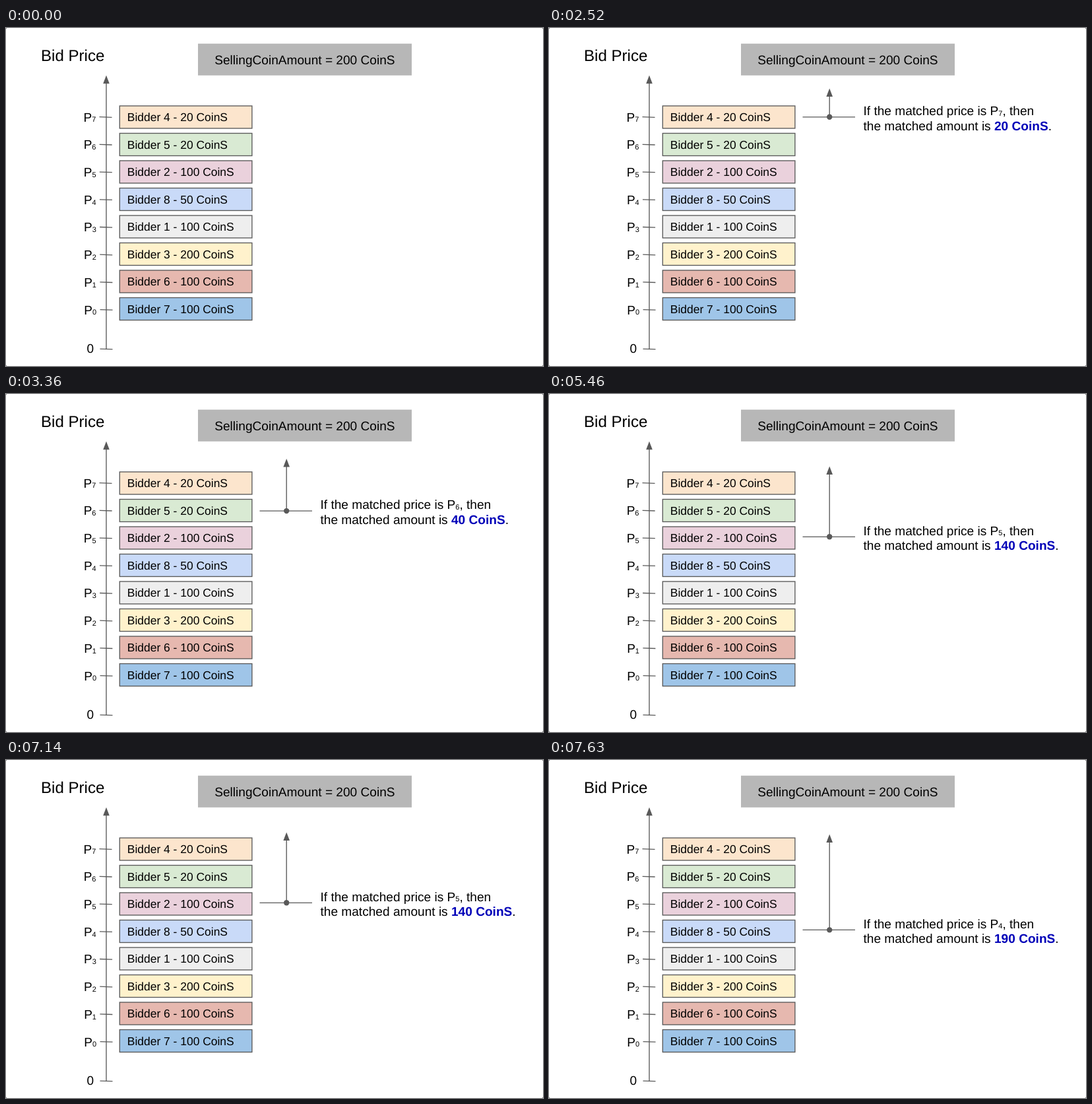
An HTML page with a canvas for the animation above (8 s loop, 814x512 px).

```html
<!DOCTYPE html>
<html lang="en">
<head>
<meta charset="utf-8">
<title>Bid matching</title>
<style>
  html, body { margin: 0; width: 100%; height: 100%; overflow: hidden; background: #fff; }
  canvas { display: block; }
</style>
</head>
<body>
<canvas id="stage" width="814" height="512"></canvas>
<script>
const ctx = document.getElementById('stage').getContext('2d');
const LOOP = 8000;
const INK = '#595959';
const FAMILY = '"Liberation Sans", Arial, sans-serif';
const SUB_SIZE = 11;

// Highest price first.
const bids = [
  { bidder: 4, coins: 20, color: '#fce5cd' },
  { bidder: 5, coins: 20, color: '#d9ead3' },
  { bidder: 2, coins: 100, color: '#ead1dc' },
  { bidder: 8, coins: 50, color: '#c9daf8' },
  { bidder: 1, coins: 100, color: '#eeeeee' },
  { bidder: 3, coins: 200, color: '#fff2cc' },
  { bidder: 6, coins: 100, color: '#e6b8af' },
  { bidder: 7, coins: 100, color: '#9fc5e8' }
];

// One candidate price per step, from the top bid downwards.
const matches = [
  { start: 1260, lineY: 134.8, tip: 91.5, textY: 132 },
  { start: 3360, lineY: 177.1, tip: 98, textY: 174 },
  { start: 5460, lineY: 216.3, tip: 109.5, textY: 213.5 },
  { start: 7560, lineY: 257.4, tip: 112.5, textY: 254.5 }
];

// Draws text and returns the x where it ends.
function text(str, x, y, size, color = '#000', weight = 'normal') {
  ctx.font = `${weight} ${size}px ${FAMILY}`;
  ctx.fillStyle = color;
  ctx.fillText(str, x, y);
  return x + ctx.measureText(str).width;
}

function priceName(index, x, y, size) {
  const end = text('P', x, y, size);
  return text(String(index), end, y + 0.8, SUB_SIZE);
}

function line(x1, y1, x2, y2) {
  ctx.strokeStyle = INK;
  ctx.lineWidth = 1.35;
  ctx.beginPath();
  ctx.moveTo(x1, y1);
  ctx.lineTo(x2, y2);
  ctx.stroke();
}

function arrowUp(x, bottom, tip) {
  line(x, bottom, x, tip + 11);
  ctx.fillStyle = INK;
  ctx.beginPath();
  ctx.moveTo(x, tip);
  ctx.lineTo(x + 4.8, tip + 12.5);
  ctx.lineTo(x - 4.8, tip + 12.5);
  ctx.fill();
}

function drawCorners() {
  ctx.fillStyle = '#777';
  for (const x of [0, 813]) {
    for (const y of [0, 511]) ctx.fillRect(x, y, 1, 1);
  }
}

function drawChart() {
  text('Bid Price', 53, 50, 24.1);
  ctx.fillStyle = '#b7b7b7';
  ctx.fillRect(291, 23.7, 324, 48.1);
  text('SellingCoinAmount = 200 CoinS', 316.2, 54.6, 19.1);

  arrowUp(152, 486.5, 71.7);
  line(142.5, 486.2, 161.5, 486.7);
  text('0', 122.5, 492, 19);

  bids.forEach(({ bidder, coins, color }, i) => {
    const tickY = 135 + i * 41.7;
    const top = 118 + i * 41.5;
    line(141.5 + i * 0.15, tickY - 0.3, 160.5 + i * 0.15, tickY + 0.3);
    priceName(bids.length - 1 - i, 117.6 + i * 0.1, tickY + 6.6, 19);
    ctx.fillStyle = color;
    ctx.fillRect(172.3, top, 200.6, 34);
    ctx.strokeStyle = INK;
    ctx.lineWidth = 1.35;
    ctx.strokeRect(172.3, top, 200.6, 34);
    text(`Bidder ${bidder} - ${coins} CoinS`, 183.8, top + 23.1, 17.45);
  });
}

function drawMatch(step) {
  const { lineY, tip, textY } = matches[step];
  const total = bids.slice(0, step + 1).reduce((sum, bid) => sum + bid.coins, 0);
  const left = 476.5;
  const size = 19.1;

  line(384.5, lineY, 464, lineY);
  arrowUp(425.2, lineY, tip);
  ctx.beginPath();
  ctx.arc(425.2, lineY, 4.2, 0, Math.PI * 2);
  ctx.fill();

  let x = text('If the matched price is ', left, textY, size);
  x = priceName(bids.length - 1 - step, x, textY, size);
  text(', then', x, textY, size);
  x = text('the matched amount is ', left, textY + 22.9, size);
  x = text(`${total} CoinS`, x, textY + 22.9, size, '#0000b8', 'bold');
  text('.', x, textY + 22.9, size);
}

function render(now) {
  const time = now % LOOP;
  const step = matches.filter(match => time >= match.start).length - 1;
  ctx.fillStyle = '#fff';
  ctx.fillRect(0, 0, 814, 512);
  drawChart();
  if (step >= 0) drawMatch(step);
  drawCorners();
}

ctx.textRendering = 'geometricPrecision';
const began = performance.now();
function tick() {
  render(performance.now() - began);
  requestAnimationFrame(tick);
}
tick();
</script>
</body>
</html>
```
